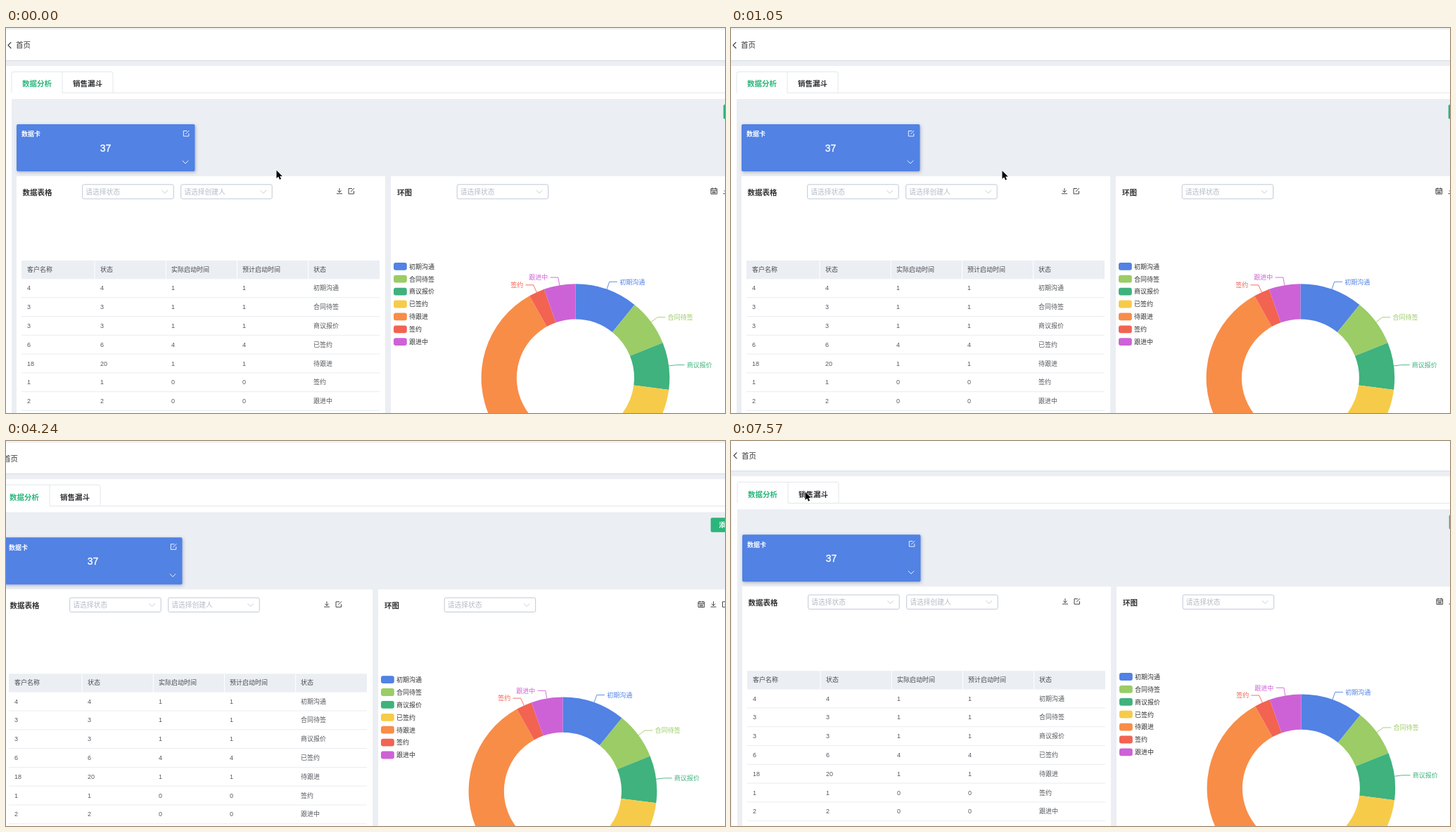
An HTML page that plays this animation: 1022 px wide and 548 px high, repeating every 8000 ms.

```html
<!DOCTYPE html>
<html lang="zh-CN">
<head>
<meta charset="utf-8">
<title>首页</title>
<style>
html, body { margin: 0; width: 100%; height: 100%; overflow: hidden; background: #ebeef3; }
svg { display: block; }
text { font-family: "Liberation Sans", "Noto Sans CJK SC", "Noto Sans CJK", sans-serif; white-space: pre; }
</style>
</head>
<body>
<svg id="stage" width="1022" height="548" viewBox="0 0 1022 548"></svg>
<script>
const GREEN = '#2bb57c', BLUE = '#5182e4', GREY = '#ebeef3', INK = '#303133';
const LOOP = 8000;

// name, count, second count, third count, colour
const states = [
  ['初期沟通', 4, 4, 1, BLUE],
  ['合同待签', 3, 3, 1, '#9bcc66'],
  ['商议报价', 3, 3, 1, '#3fb27e'],
  ['已签约', 6, 6, 4, '#f7cb4a'],
  ['待跟进', 18, 20, 1, '#f88d48'],
  ['签约', 1, 1, 0, '#f26352'],
  ['跟进中', 2, 2, 0, '#cd62d6'],
];

const rect = (x, y, w, h, fill, more = '') =>
  `<rect x="${x}" y="${y}" width="${w}" height="${h}" fill="${fill}" ${more}/>`;
const line = (d, color, width = 1) =>
  `<path d="${d}" fill="none" stroke="${color}" stroke-width="${width}"/>`;
// y is the middle of the line of text
const label = (str, x, y, size, fill, more = '') =>
  `<text x="${x}" y="${y + size * 0.37}" font-size="${size}" fill="${fill}" ${more}>${str}</text>`;
const bold = 'font-weight="600"';
const middle = 'text-anchor="middle"';

const shapes = {
  edit: 'M1-3.5H-4V4H3.5V0M-1 1L4-4',
  download: 'M0-4V2M-2.6-.6L0 2L2.6-.6M-4 3.8H4',
  calendar: 'M-4.3-3.3H4.3V4.2H-4.3ZM-4.3-.9H4.3M-2.2-4.6V-2.4M2.2-4.6V-2.4M-2.6 1H2.6M-2.6 2.6H2.6',
  chevron: 'M-4.3-2L0 2.2L4.3-2',
};
const icon = (name, x, y, color = INK, width = 0.9) =>
  `<g transform="translate(${x} ${y})">${line(shapes[name], color, width)}</g>`;

const select = (str, x) =>
  rect(x, 222.8, 129.5, 20.3, '#fff', 'rx="2" stroke="#bfc8d8"') +
  label(str, x + 4.5, 233, 9.75, '#b4bac6') +
  icon('chevron', x + 117, 233, '#b9c0cc', 0.8);

function tabs() {
  return line('M80 92.3H1100M8 92.3V65Q8 62.3 11 62.3H149Q152 62.3 152 65V92.3M80 62.3V92.3', '#e2e6ec') +
    label('数据分析', 23, 79.5, 10.5, GREEN, bold) +
    label('销售漏斗', 95, 79.5, 10.5, INK, bold);
}

function card() {
  return rect(15, 137, 253.5, 67, BLUE, 'rx="2" filter="url(#shadow)"') +
    label('数据卡', 22, 151, 9, '#fff', bold) +
    label('37', 141.5, 170.5, 14, '#fff', middle + ' stroke="#fff" stroke-width=".35"') +
    icon('edit', 256.3, 150, '#fff') +
    icon('chevron', 255, 190.7, '#fff');
}

function table() {
  const cols = [30, 134, 235, 336, 437], step = 26.8;
  let out = rect(15, 211, 524, 700, '#fff') +
    label('数据表格', 23.5, 234, 10.5, INK, bold) +
    select('请选择状态', 108.7) + select('请选择创建人', 248.7) +
    icon('download', 474, 232) + icon('edit', 491, 232) +
    rect(22, 331, 509, 26.3, GREY) +
    line('M126 331V357.3M227.3 331V357.3M328.5 331V357.3M429.7 331V357.3', '#fff');
  ['客户名称', '状态', '实际启动时间', '预计启动时间', '状态']
    .forEach((str, i) => out += label(str, cols[i], 343.3, 9, '#484a50'));
  states.forEach(([name, a, b, c], i) => {
    const y = 370 + i * step;
    [a, b, c, c, name].forEach((v, k) => out += label(v, cols[k], y, 9, '#55575c'));
    out += line(`M22 ${y + 13.7}H531`, '#e9ecf1');
  });
  return out;
}

function donut() {
  const cx = 809.4, cy = 498, outer = 133.8, inner = 83.5;
  const total = states.reduce((sum, s) => sum + s[1], 0);
  const at = (turn, r) => [cx + r * Math.sin(turn * 2 * Math.PI), cy - r * Math.cos(turn * 2 * Math.PI)];
  let out = '', sum = 0;
  states.forEach(([name, count, , , color], i) => {
    const a = sum / total, b = (sum += count) / total, mid = (a + b) / 2;
    const big = b - a > 0.5 ? 1 : 0;
    out += `<path fill="${color}" d="M${at(a, outer)}A${outer} ${outer} 0 ${big} 1 ${at(b, outer)}` +
      `L${at(b, inner)}A${inner} ${inner} 0 ${big} 0 ${at(a, inner)}Z"/>`;
    const [x, y] = at(mid, outer + 11.25), side = mid < 0.5 ? 1 : -1;
    out += line(`M${at(mid, outer)}L${x} ${y}h${side * 11.25}`, color, 0.9) +
      label(name, x + side * 14.5, y, 9, color, side < 0 ? 'text-anchor="end"' : '');
    const ly = 339.3 + i * 17.9;
    out += rect(551, ly - 5.4, 18.8, 10.8, color, 'rx="3"') + label(name, 573, ly, 9, INK);
  });
  return out;
}

function chart() {
  return rect(547, 211, 524, 700, '#fff') +
    label('环图', 556, 234, 10.5, INK, bold) +
    select('请选择状态', 641.2) +
    icon('calendar', 1006.3, 232) + icon('download', 1023.5, 232) + icon('edit', 1040.5, 232) +
    donut();
}

function header() {
  return rect(-60, -10, 1200, 56.2, '#fff') +
    rect(-60, 0.6, 1200, 1, '#dfe0e2') +
    rect(-60, 46, 1200, 1, '#d9dce1') +
    line('M7.3 20.2L3 24.6L7.3 29', INK, 1.1) +
    label('首页', 14, 24.5, 10.5, INK) +
    '<g clip-path="url(#round)">' + rect(1050, 8, 32, 32, '#1c3157') +
    '<path d="M1061 37L1064 22L1072 10L1082 14L1074 37Z" fill="#4a77ad"/>' +
    '<path d="M1063 34L1068 22L1069 34Z" fill="#c5d8ea"/></g>';
}

const stage = document.getElementById('stage');
stage.innerHTML = `
<defs>
  <filter id="shadow" x="-10%" y="-20%" width="120%" height="150%">
    <feDropShadow dx="1" dy="1.5" stdDeviation="2" flood-color="#304060" flood-opacity=".35"/>
  </filter>
  <clipPath id="view"><rect x="-60" y="54" width="1200" height="600"/></clipPath>
  <clipPath id="round"><circle cx="1065.5" cy="23.5" r="12.5"/></clipPath>
</defs>
${rect(0, 0, 1022, 548, GREY)}
<g id="page">
  ${header()}
  ${rect(0, 54, 1200, 600, '#fff')}
  <g clip-path="url(#view)"><g id="content">
    ${rect(8, 101, 1200, 900, GREY)}
    ${tabs()}
    ${rect(1019.7, 109, 44, 20.5, GREEN, 'rx="2"')}
    ${label('添 加', 1041.5, 119.3, 9, '#fff', bold + ' ' + middle)}
    ${card()}${table()}${chart()}
  </g></g>
</g>
<path id="cursor" d="M0 0V11.6L2.7 9.1L4.5 13.2L6.5 12.3L4.7 8.4H8.3Z" fill="#000" stroke="#fff" stroke-width="1.2" paint-order="stroke"/>`;

// Tracks hold each value until the next time: [time, ...values]
const scroll = [[0, 0], [150, 62], [300, 120], [750, 108], [900, 76], [1050, 0]];
const pan = [[0, 0, 0], [3790, -1.6, 0], [3920, -6, 0], [4240, -18, 0.3], [4440, -33, 0.6], [4750, -44.5, 0.9]];
for (let i = 0; i < 8; i++) pan.push([6530 + i * 1040 / 7, -42.3 + i * 43.3 / 7, 0.9 - i * 4.7 / 7]);

const off = [-50, -50];
const pointer = [
  [0, 384.5, 202.5], [150, 385.5, 203.2],
  [1500, 440, 190], [1650, 600, 150], [1800, 800, 118], [1950, 975, 122], [2100, ...off],
  [2700, 1020.5, 148], [3150, ...off],
  [4440, 1008, 150], [4750, 961.5, 154.5],
  [5350, 962.5, 155.5], [5500, 944, 142], [5650, 896, 112], [5800, 826, 76],
  [5950, 745, 43], [6100, 668, 18], [6250, 602, 2], [6390, ...off],
  [7272, 122, -6], [7421, 112, 36], [7570, 105.5, 72.5],
];

const valueAt = (track, t) => track.filter(k => k[0] <= t + 0.5).pop().slice(1);
const move = (id, [x, y]) =>
  document.getElementById(id).setAttribute('transform', `translate(${x} ${y})`);

function draw(now) {
  const t = now % LOOP;
  move('page', valueAt(pan, t));
  move('content', [0, -valueAt(scroll, t)[0]]);
  move('cursor', valueAt(pointer, t));
}

const start = performance.now();
function tick() {
  draw(performance.now() - start);
  requestAnimationFrame(tick);
}
tick();
</script>
</body>
</html>
```
